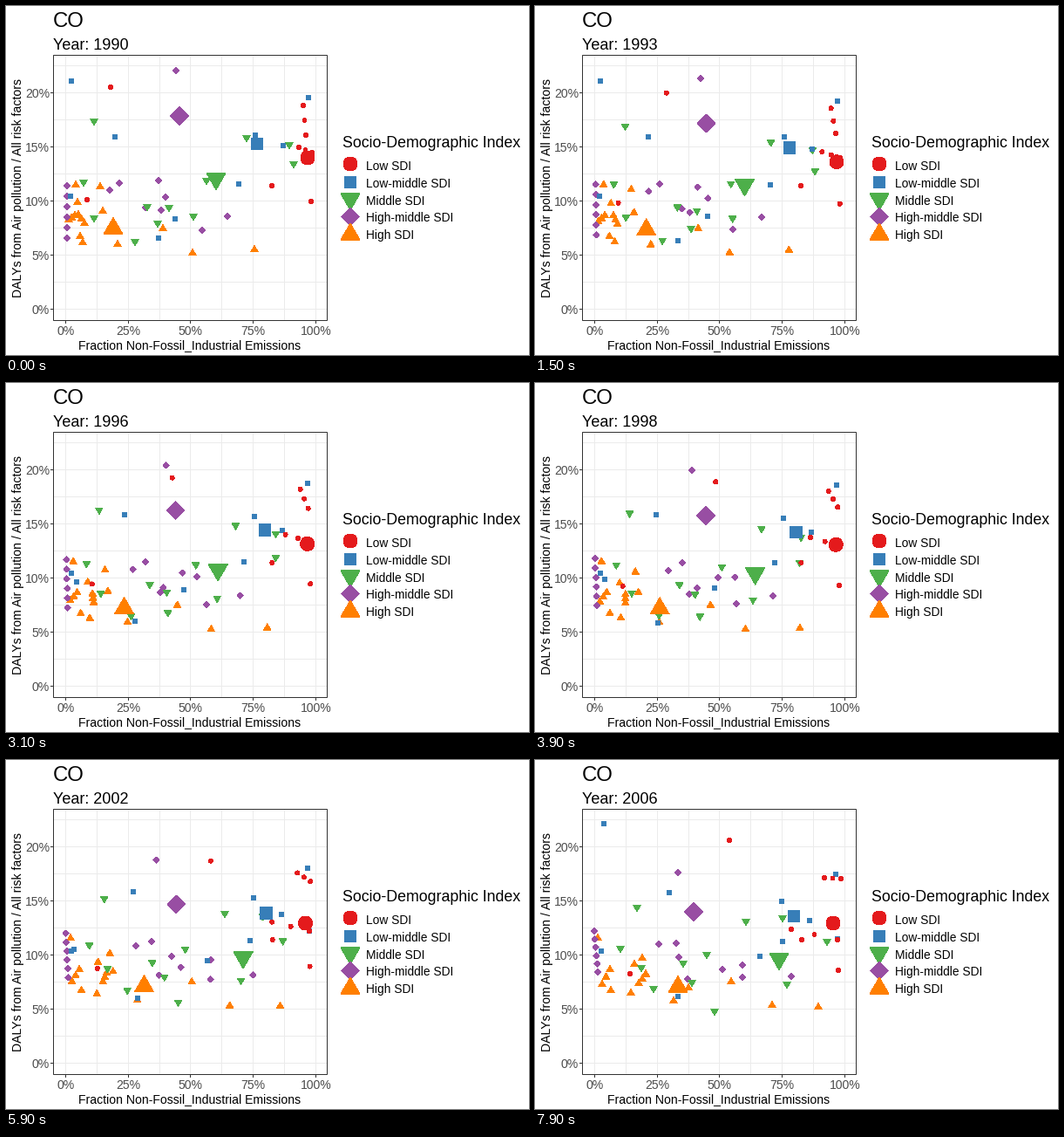
A matplotlib script that plays this animation: 600 px wide and 400 px high, repeating every 8000 ms.

```python
import numpy as np
import matplotlib.pyplot as plt
from matplotlib.animation import FuncAnimation
from matplotlib.collections import PathCollection
from matplotlib.path import Path
from matplotlib.patches import Rectangle
from matplotlib.transforms import IdentityTransform

W, H, DPI = 600, 400, 100
LAST = 38                # last step of the loop
YEARS_PER_STEP = 3 / 7
PX = 72 / DPI            # one pixel in points
plt.rcParams["font.family"] = "Liberation Sans"


def lane(n, *phases, at=None):
    """n points spread evenly along a segment that drifts from phase to phase."""
    at = np.linspace(0, LAST, len(phases)) if at is None else at
    p = np.array(phases, float)
    a, b = p[:, :2], p[:, -2:]
    return [(at, a + (b - a) * u) for u in np.linspace(0, 1, n)]


def place(track, step):
    at, xy = track
    return np.interp(step, at, xy[:, 0]), np.interp(step, at, xy[:, 1])


def poly(*pts):
    return Path(list(pts) + [pts[0]], closed=True)


def scaled(path, r):
    return Path(path.vertices * r, path.codes)


# Each lane is a segment (x0, y0, x1, y1) or a single point (x, y) per phase.
low = (
    lane(1, (120, 93), (185, 107), (238, 122), (223, 92))
    + lane(3, (341, 114, 344, 148), (332, 135, 351, 136))
    + lane(3, (336, 162, 351, 168), (294, 194, 347, 206))
    + lane(2, (305, 206, 350, 224), (306, 206, 348, 241))
    + lane(1, (93, 222), (109, 245))
)
low_middle = (
    lane(1, (75, 86), (82, 230), (78, 217), (79, 73), at=(7, 11, 28, 31))
    + lane(2, (125, 150, 74, 218), (154, 152, 76, 219))
    + lane(3, (286, 148, 350, 172), (283, 162, 347, 205))
    + lane(2, (347, 105, 267, 204), (345, 131, 284, 208))
    + lane(2, (194, 244, 175, 266), (207, 234, 139, 275), (258, 225, 164, 271))
)
middle = (
    lane(2, (101, 133, 276, 152), (117, 170, 242, 186))
    + lane(2, (325, 160, 330, 182), (304, 179, 302, 208), (284, 182, 335, 209))
    + lane(2, (89, 203, 101, 244), (98, 217, 122, 239))
    + lane(2, (230, 201, 215, 242), (197, 224, 289, 258))
    + lane(2, (162, 231, 187, 232), (170, 234, 180, 256))
    + lane(2, (148, 271, 174, 250), (136, 263, 206, 289))
)
high_middle = (
    lane(6, (70, 206, 70, 266), (68, 196, 72, 243))
    + lane(2, (195, 74, 225, 257), (164, 129, 238, 249))
    + lane(2, (119, 211, 130, 203), (155, 215, 171, 206), (142, 211, 162, 210))
    + lane(2, (175, 200, 183, 219), (212, 224, 232, 223), (165, 226, 238, 235))
    + lane(2, (160, 231, 178, 234), (215, 240, 175, 251))
    + lane(1, (254, 241), (294, 248))
)
high = (
    lane(2, (80, 204, 108, 206), (72, 203, 123, 226))
    + lane(2, (111, 234, 82, 224), (127, 244, 114, 233))
    + lane(3, (79, 239, 72, 244), (86, 239, 77, 256))
    + lane(3, (83, 238, 90, 248), (127, 245, 119, 255))
    + lane(2, (85, 263, 88, 270), (87, 263, 110, 266))
    + lane(2, (128, 272, 180, 254), (159, 275, 225, 253))
    + lane(2, (214, 282, 285, 278), (272, 280, 325, 282))
    + lane(1, (117, 257), (176, 260))
)
means = (
    lane(1, (346, 174), (346, 184), (344, 187), (342, 187))
    + lane(1, (288, 158), (300, 172), (297, 179))
    + lane(1, (241, 201), (240, 216), (270, 229), (280, 231))
    + lane(1, (199, 126), (194, 144), (199, 163), (182, 174))
    + lane(1, (123, 252), (133, 255), (157, 256), (164, 257))
)

# name, colour, unit shape, small and large half width, legend height, tracks
SERIES = [
    ("Low SDI", "#E41A1C", Path.unit_circle(), 2.5, 8.0, 181, low),
    ("Low-middle SDI", "#377EB8", poly((-1, -1), (1, -1), (1, 1), (-1, 1)),
     3.0, 7.2, 202, low_middle),
    ("Middle SDI", "#4DAF4A", poly((-1, .87), (1, .87), (0, -.87)),
     4.1, 11.0, 224.5, middle),
    ("High-middle SDI", "#984EA3", poly((0, 1), (1, 0), (0, -1), (-1, 0)),
     3.5, 10.2, 241.5, high_middle),
    ("High SDI", "#FF7F00", poly((-1, -.87), (1, -.87), (0, .87)),
     4.1, 11.0, 258.5, high),
]

fig = plt.figure(figsize=(W / DPI, H / DPI), dpi=DPI, facecolor="white")
ax = fig.add_axes([0, 0, 1, 1])
ax.set_xlim(0, W)
ax.set_ylim(H, 0)
ax.axis("off")


def label(x, y, s, px, color="black", **kw):
    return ax.text(x, y, s, fontsize=px * PX, color=color, **kw)


def line(xs, ys, color, z):
    ax.plot(xs, ys, color=color, lw=PX, zorder=z, snap=False,
            solid_capstyle="butt")


def centre(v):
    return np.floor(v) + 0.5


def markers(paths, colors, offsets, z):
    c = PathCollection(paths, offsets=offsets, offset_transform=ax.transData,
                       facecolors=colors, edgecolors="none", linewidths=0,
                       antialiaseds=False, zorder=z)
    c.set_transform(IdentityTransform())
    ax.add_collection(c, autolim=False)
    return c


# Panel
LEFT, RIGHT, TOP, BOTTOM = 54.5, 368.5, 56.5, 360.5
GRID, DARK = "#EBEBEB", "#333333"
for i in range(9):
    x = centre(68.5 + 35.85 * i)
    line([x, x], [TOP, BOTTOM], GRID, 1)
for i in range(10):
    y = centre(347.5 - 31 * i)
    line([LEFT, RIGHT], [y, y], GRID, 1)
for i in range(5):
    x, y = centre(68.5 + 71.7 * i), centre(347.5 - 62 * i)
    line([x, x], [BOTTOM, BOTTOM + 3.5], DARK, 2)
    line([LEFT - 3.5, LEFT], [y, y], DARK, 2)
    label(x, 377, f"{25 * i}%", 14, "#4D4D4D", ha="center")
    label(50, y + 5.5, f"{5 * i}%", 14, "#4D4D4D", ha="right")
ax.add_patch(Rectangle((LEFT, TOP), RIGHT - LEFT, BOTTOM - TOP, fill=False,
                       ec=DARK, lw=PX, snap=False, zorder=9))

# Titles
label(54, 24, "CO", 24)
year = label(54, 50, "", 18)
label(210.5, 393, "Fraction Non-Fossil_Industrial Emissions", 14, ha="center")
label(21, 208, "DALYs from Air pollution / All risk factors", 14,
      rotation=90, ha="right", va="center")

# Legend
label(385.5, 162, "Socio-Demographic Index", 17.7)
for i, s in enumerate(SERIES):
    label(413, 188 + 19.75 * i, s[0], 13.8)
big = [scaled(s[2], s[4]) for s in SERIES]
hues = [s[1] for s in SERIES]
markers(big, hues, [(395, s[5]) for s in SERIES], 3)

# Data points, with the group means on top
paths, colors, tracks = [], [], []
for name, hue, shape, small, large, key_y, group in reversed(SERIES):
    paths += [scaled(shape, small)] * len(group)
    colors += [hue] * len(group)
    tracks += group
paths += big
colors += hues
tracks += means


def positions(step):
    return np.array([place(t, step) for t in tracks])


points = markers(paths, colors, positions(0), 5)


def update(n):
    # Hold for half a second, then one step every 200 ms.
    step = 0 if n < 5 else 1 + (n - 5) // 2
    points.set_offsets(positions(step))
    year.set_text(f"Year: {round(1990 + step * YEARS_PER_STEP)}")
    return points, year


anim = FuncAnimation(fig, update, frames=80, interval=100, repeat=True,
                     repeat_delay=0, blit=False)
plt.show()
```
